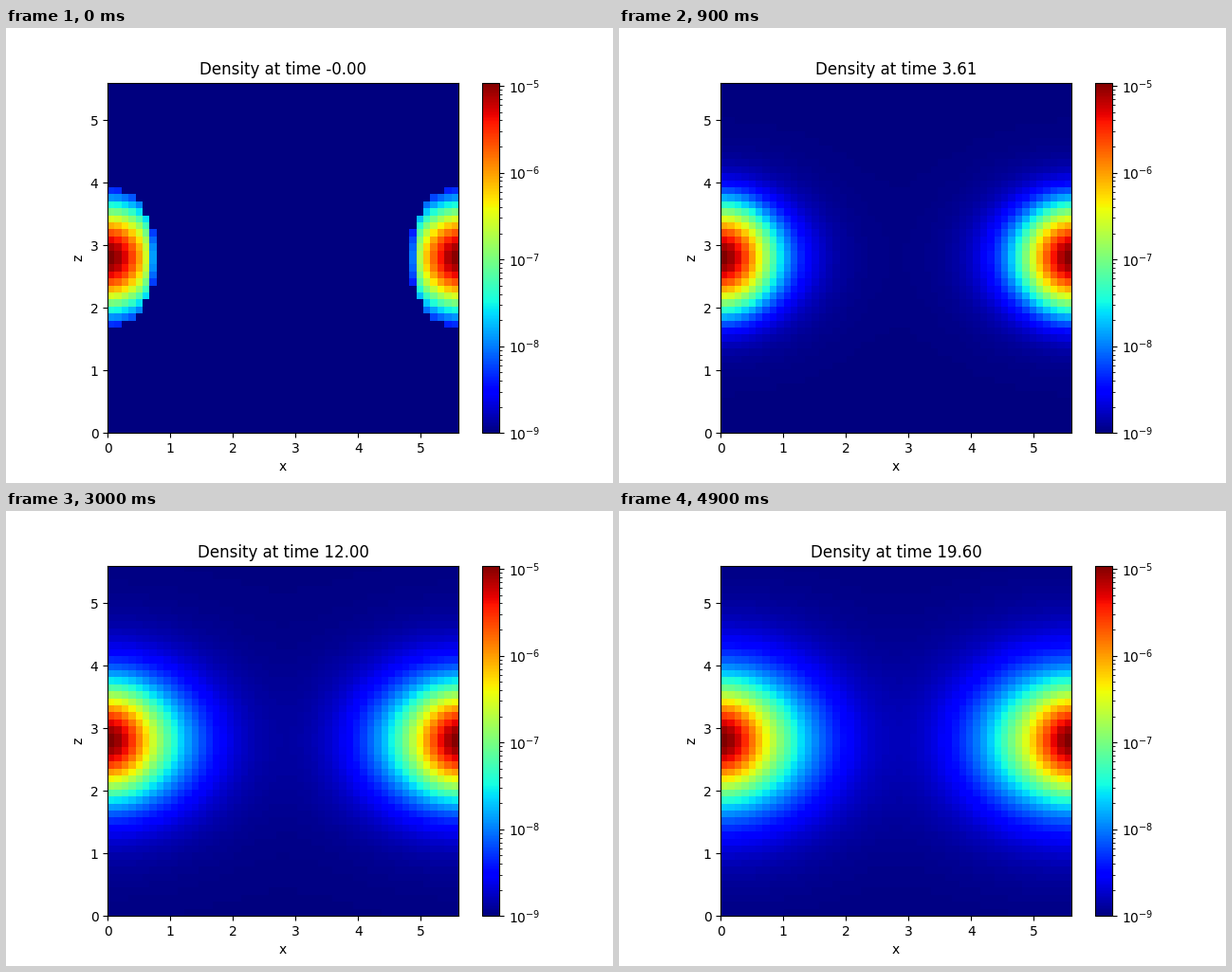
Animation, 640 px wide and 480 px high, one loop 5 s. Source, as a matplotlib script:

```python
import numpy as np
import matplotlib.pyplot as plt
from matplotlib.animation import FuncAnimation
from matplotlib.colors import LogNorm

SIZE, CELLS = 5.6, 50
FRAMES, INTERVAL = 50, 100
FLOOR, PEAK = 1e-9, 1.09e-5
OUTPUT_STEP = 0.4
DT = OUTPUT_STEP / 39.83
OFFSET = 0.02  # the blob centre lies just inside the left wall

axis = (np.arange(CELLS) + 0.5) * SIZE / CELLS
x, z = np.meshgrid(axis, axis - SIZE / 2)


def core(dx):
    return 1.12e-5 * (1 + 1.5 * (dx**2 + z**2)) ** -8


def halo(dx):
    s = np.hypot(dx, z / 0.78)
    return 7.4e-7 * (1 + (s / 0.7) ** 4) ** -1.4


def initial_cut():
    wall = np.minimum(x, SIZE - x)
    inside = (wall / 0.8) ** 2 + (z / 1.1) ** 2 < 1
    return inside * 10 ** -np.minimum((wall / 0.728) ** 14, 30)


left, right = x - OFFSET, x - OFFSET - SIZE
CORE = core(left) + core(right)
HALO = halo(left) + halo(right)
CUT = initial_cut()


def output_time(frame):
    """Time of the first solver step at or after the scheduled output."""
    return np.ceil(frame * OUTPUT_STEP / DT - 1e-9) * DT


def density(t):
    filled = CUT + (1 - CUT) * (1 - np.exp(-t / 0.8))
    return FLOOR + CORE * filled + HALO * (t / 19.6) ** 1.27


fig, ax = plt.subplots(figsize=(6.4, 4.8), dpi=100)
image = ax.imshow(density(0), origin="lower", extent=(0, SIZE, 0, SIZE),
                  cmap="jet", norm=LogNorm(FLOOR, PEAK),
                  interpolation="nearest")
fig.colorbar(image)
ax.set_xlabel("x")
ax.set_ylabel("z")
title = ax.set_title("Density at time 0.00")


def update(frame):
    t = output_time(frame)
    image.set_data(density(t))
    title.set_text(f"Density at time {t:.2f}")
    return image, title


anim = FuncAnimation(fig, update, frames=FRAMES, interval=INTERVAL,
                     repeat=True, repeat_delay=0)
plt.show()
```
